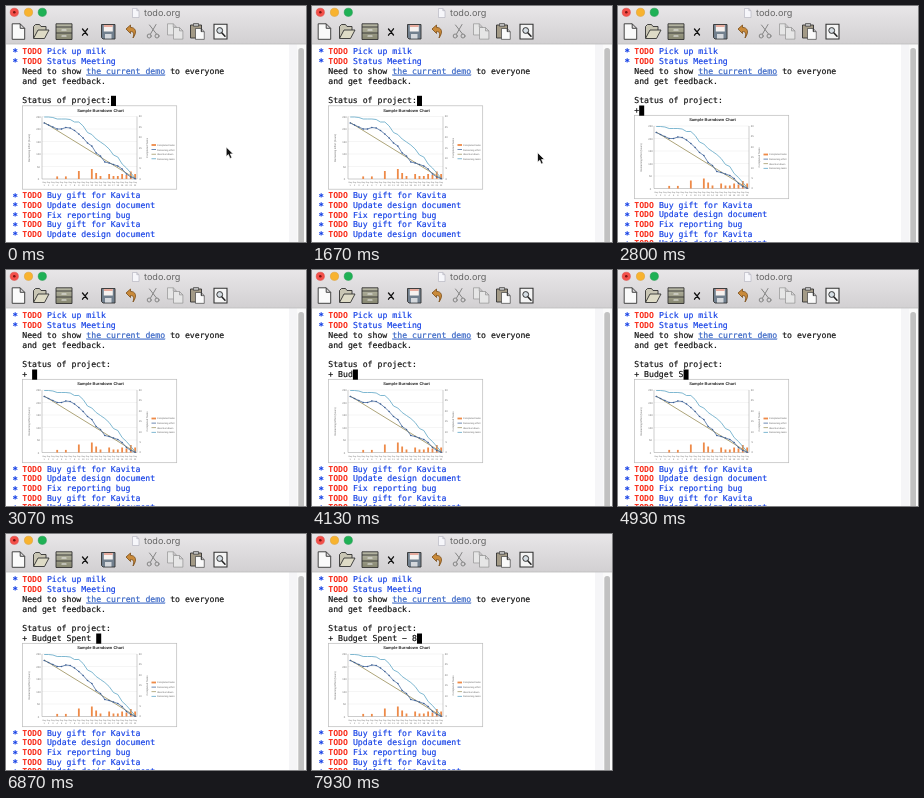
An HTML page for the animation above (8 s loop, 300 by 236 pixels).

```html
<!DOCTYPE html>
<html lang="en">
<head>
<meta charset="utf-8">
<title>todo.org</title>
<style>
  html, body { margin: 0; width: 100%; height: 100%; overflow: hidden; background: #fff; }
  svg { display: block; width: 300px; height: 236px; overflow: hidden; }
  text { white-space: pre; text-rendering: geometricPrecision; }
  .mono { font: 8.19px "DejaVu Sans Mono", monospace; fill: #111; stroke: #111; stroke-width: .18; }
  .todo { font-weight: bold; fill: #f92a18; stroke: none; }
  .head { fill: #1440e6; stroke: #1440e6; }
  .star { font-size: 9px; font-weight: bold; }
  .link { fill: #3563c4; stroke: #3563c4; text-decoration: underline; }
  .chart text { font-family: "Liberation Sans", Arial, sans-serif; font-size: 2.6px; fill: #666; }
  .chart .title { font-size: 4px; font-weight: bold; fill: #222; }
  .line { fill: none; stroke-linejoin: round; }
  .icon { fill: none; stroke-linecap: round; stroke-linejoin: round; }
</style>
</head>
<body>
<svg id="stage" viewBox="0 0 300 236">
  <defs>
    <linearGradient id="bar" x1="0" y1="0" x2="0" y2="1">
      <stop offset="0" stop-color="#e8e6e8"/><stop offset="1" stop-color="#d2d0d2"/>
    </linearGradient>
    <linearGradient id="metal" x1="0" y1="0" x2="0" y2="1">
      <stop offset="0" stop-color="#b9b9a6"/><stop offset="1" stop-color="#85856f"/>
    </linearGradient>
    <path id="sheet" d="M0 0h8l4.500 4.500v11h-12.500zM8 0v4.500h4.500" stroke-width=".9" stroke-linejoin="round"/>
  </defs>
  <rect width="300" height="236" fill="#fff"/>
  <g id="page"></g>
  <g id="lower"></g>
  <rect id="caret" width="5" height="10.2"/>
  <path id="mouse" d="M0 0v9.6l2.200-2 1.600 3.900 1.900-.8-1.600-3.800h3z" fill="#111" stroke="#fff" stroke-width=".7"/>
  <rect x="283" y="38" width="8" height="198" fill="#f5f5f7"/>
  <rect x="291" y="38" width="9" height="198" fill="#fafafa"/>
  <rect x="292.3" y="42" width="5.7" height="202" rx="2.8" fill="#c1c1c1"/>
  <g id="chrome">
    <rect width="300" height="38" fill="url(#bar)"/>
    <path d="M0 38h300" stroke="#bbb" stroke-width=".8"/>
    <g stroke-width=".5">
      <circle cx="8.3" cy="6.3" r="4.1" fill="#f4504a" stroke="#d8403b"/>
      <circle cx="8.3" cy="6.3" r="1.3" fill="#7a1511"/>
      <circle cx="22.5" cy="6.3" r="4.1" fill="#f8b32f" stroke="#d8982a"/>
      <circle cx="36.3" cy="6.3" r="4.1" fill="#1fb155" stroke="#189246"/>
    </g>
    <path d="M126.500 2.500h4.300l2.200 2.200v6.800h-6.500zM130.800 2.500v2.200h2.200" fill="#f6f6fa" stroke="#b0b0bc" stroke-width=".6"/>
    <text x="138" y="10" style="font:9.1px Inter,sans-serif" fill="#666">todo.org</text>

    <use href="#sheet" x="6.2" y="17.8" fill="#fafafa" stroke="#333"/>
    <g stroke="#333" stroke-width=".9" stroke-linejoin="round">
      <path d="M27.500 32v-11.500l2-2h4l1.500 2h5v4" fill="#c9c6b4"/>
      <path d="M27.500 32.500l4.500-8.500h11l-4.500 8.500z" fill="#dedbc6"/>
      <path d="M50 17.800h16v15.700h-16z" fill="url(#metal)"/>
      <path d="M50 21h16M50 27h16"/>
    </g>
    <path class="icon" d="M56 24h4M56 30h4" stroke="#eee" stroke-width="1.2"/>
    <path class="icon" d="M76.500 23l5 6M81.500 22.800l-5 6.400" stroke="#111" stroke-width="1.3"/>
    <path d="M95.500 18.500h13.500v14.500h-12l-1.500-1.500z" fill="#72808e" stroke="#333" stroke-width=".9"/>
    <path d="M97.800 19h9v6.500h-9z" fill="#f6f2f0"/>
    <path d="M98 20h8.600" stroke="#d8654a"/>
    <path d="M99 28h6.500v4.500h-6.500z" fill="#d5d8dc"/>
    <path d="M120 23l4.500-4v2.400c5 0 7 4.500 2.500 10.600 1.500-5 .5-6.500-2.500-6.500v2z" fill="#c98a3a" stroke="#7a4c16" stroke-width=".8" stroke-linejoin="round"/>
    <g class="icon" stroke="#858585">
      <path d="M150 18.500l-5.500 9.500M143.500 19l7 9"/>
      <circle cx="143.200" cy="30" r="2"/><circle cx="151" cy="30" r="2"/>
    </g>
    <use href="#sheet" transform="translate(161.500 17.800) scale(.72)" fill="#e6e6e6" stroke="#8c8c8c"/>
    <use href="#sheet" transform="translate(167.500 21.500) scale(.75)" fill="#e6e6e6" stroke="#8c8c8c"/>
    <path d="M184.500 19h11v13h-11z" fill="#a39a86" stroke="#333" stroke-width=".9"/>
    <path d="M187.500 17.500h5v2.800h-5z" fill="#bbb" stroke="#333" stroke-width=".6"/>
    <use href="#sheet" transform="translate(189.500 22.500) scale(.7)" fill="#fafafa" stroke="#333"/>
    <path d="M208 18.300h13v14.700h-13z" fill="#f4f4f4" stroke="#333" stroke-width="1.1"/>
    <circle cx="213.700" cy="24.500" r="2.900" fill="#d6dee4" stroke="#333" stroke-width="1"/>
    <path class="icon" d="M216 27l3 3.300" stroke="#222" stroke-width="1.500"/>
  </g>
</svg>
<script>
const LOOP = 8000, COL = 4.93, LEFT = 6.4, SHIFT = 9.5;
const $ = id => document.getElementById(id);
const colX = c => LEFT + c * COL;

function add(parent, tag, attrs, text) {
  const node = document.createElementNS("http://www.w3.org/2000/svg", tag);
  for (const key in attrs) node.setAttribute(key, attrs[key]);
  if (text) node.textContent = text;
  return parent.appendChild(node);
}
const write = (parent, col, y, text, cls = "") =>
  add(parent, "text", { x: colX(col), y: y + 2.7, class: "mono " + cls }, text);

function task(parent, y, title) {
  write(parent, 0, y + 1.6, "*", "head star");
  write(parent, 2, y, "TODO", "todo");
  write(parent, 7, y, title, "head");
}

const page = $("page"), lower = $("lower");
task(page, 45, "Pick up milk");
task(page, 55, "Status Meeting");
write(page, 2, 65, "Need to show");
write(page, 15, 65, "the current demo", "link");
write(page, 32, 65, "to everyone");
write(page, 2, 75, "and get feedback.");
write(page, 2, 94.6, "Status of project:");
const typed = write(page, 2, 104.5, "");
["Buy gift for Kavita", "Update design document", "Fix reporting bug",
 "Buy gift for Kavita", "Update design document"]
  .forEach((title, i) => task(lower, 189.5 + i * 9.65, title));

function drawChart() {
  const g = add(lower, "g", { class: "chart" });
  const day = i => 38.2 + i * 4.33;
  const label = (x, y, text, more) => add(g, "text", { x, y, "text-anchor": "middle", ...more }, text);
  const curve = (ys, stroke) => add(g, "polyline", {
    class: "line", stroke, "stroke-width": .8, points: ys.map((y, i) => day(i) + "," + y).join(" ")
  });
  add(g, "rect", { x: 16.5, y: 99.8, width: 154.2, height: 83.4, fill: "#fff", stroke: "#bbb", "stroke-width": .7 });
  label(94.5, 105.6, "Sample Burndown Chart", { class: "title" });
  for (let i = 0; i < 6; i++) {
    const y = 110.5 + i * 12.5;
    add(g, "path", { d: `M36 ${y}h95`, stroke: i < 5 ? "#ebebeb" : "#999", "stroke-width": .5 });
    label(32.5, y + 1, String(250 - i * 50));
  }
  for (let i = 0; i < 7; i++) label(134.3, 111.4 + i * 10.4, String(30 - i * 5));
  add(g, "path", { d: "M36 110.5v62.5M131 110.5v62.5", stroke: "#999", "stroke-width": .5 });
  label(0, 0, "Remaining Effort (hours)", { transform: "translate(23.5 142) rotate(-90)" });
  label(0, 0, "Completed Tasks", { transform: "translate(141.5 142) rotate(-90)" });

  [0, 0, 0, 2.6, 0, 2.6, 0, 0, 8, 0, 0, 10, 6, 3, 0, 5, 3, 3, 5, 4, 7.5, 5].forEach((h, i) => {
    if (h) add(g, "rect", { x: day(i) - .9, y: 173 - h, width: 1.8, height: h, fill: "#ee8a48" });
    label(day(i), 177, "Day", { style: "font-size:2px" });
    label(day(i), 180, String(i + 1), { style: "font-size:2.2px" });
  });
  add(g, "path", { d: "M38.2 116.5L129.2 172.5", stroke: "#a49a6a", "stroke-width": .9 });
  curve([111, 111, 111.5, 113, 113, 113, 113.5, 116, 116, 120, 126.5, 128.5, 133, 136, 139, 143, 149, 151, 158, 162, 167, 172], "#5fa6c6");
  const effort = [117, 119, 121, 123, 123, 121.5, 122, 124.5, 128, 132, 137, 140, 147, 150, 156, 157, 158.5, 160, 163, 168, 171, 172.7];
  curve(effort, "#4a6da0");
  effort.forEach((y, i) => add(g, "circle", { cx: day(i), cy: y, r: .8, fill: "#3d5f94" }));

  [["Completed tasks", "#ee8a48"], ["Remaining effort", "#4a6da0"],
   ["Ideal burndown", "#a49a6a"], ["Remaining tasks", "#5fa6c6"]].forEach(([name, fill], i) => {
    const y = 139 + i * 4.6;
    add(g, "rect", { x: 145.5, y: y - (i ? .4 : .9), width: 4.5, height: i ? .8 : 1.8, fill });
    label(151, y + .9, name, { "text-anchor": "start", style: "font-size:2.4px" });
  });
}
drawChart();

// [time, typed text or null before the new line, caret visible, caret column]
const steps = [
  [0, null, 1], [200, null, 0], [670, null, 1], [1200, null, 0], [1670, null, 1],
  [1930, "", 1, 0], [2330, "", 1], [2800, "+", 1], [3000, "+ ", 1], [3600, "+ ", 0]
];
const line = "+ Budget Spent ";
[3670, 3870, 4070, 4330, 4470, 4600, 4730, 4930, 5070, 5200, 5330, 5530, 5930]
  .forEach((t, i) => steps.push([t, line.slice(0, i + 3), 1]));
steps.push([6330, line, 0], [6470, line + "=", 1], [6870, line, 1],
  [7070, line + "-", 1], [7530, line + "- ", 1], [7870, line + "- 8", 1]);

const path = [[0, 220.2, 141], [70, 223.5, 145], [200, 225.5, 146.6]];
const at = (table, t) => table.findLast(row => row[0] <= t);

function render(t) {
  const [, text, on, col] = at(steps, t);
  const opened = text !== null;
  typed.textContent = (text || "").replace("-", "\u2212");
  lower.setAttribute("transform", `translate(0 ${opened ? SHIFT : 0})`);
  const caret = $("caret");
  caret.setAttribute("x", colX(opened ? col ?? 2 + text.length : 20));
  caret.setAttribute("y", opened ? 99.5 : 89.8);
  caret.setAttribute("visibility", on ? "visible" : "hidden");
  const [, x, y] = at(path, t);
  $("mouse").setAttribute("transform", `translate(${x} ${y})`);
  $("mouse").setAttribute("visibility", opened ? "hidden" : "visible");
}

const start = performance.now();
function tick() {
  render((performance.now() - start) % LOOP);
  requestAnimationFrame(tick);
}
tick();
</script>
</body>
</html>
```
